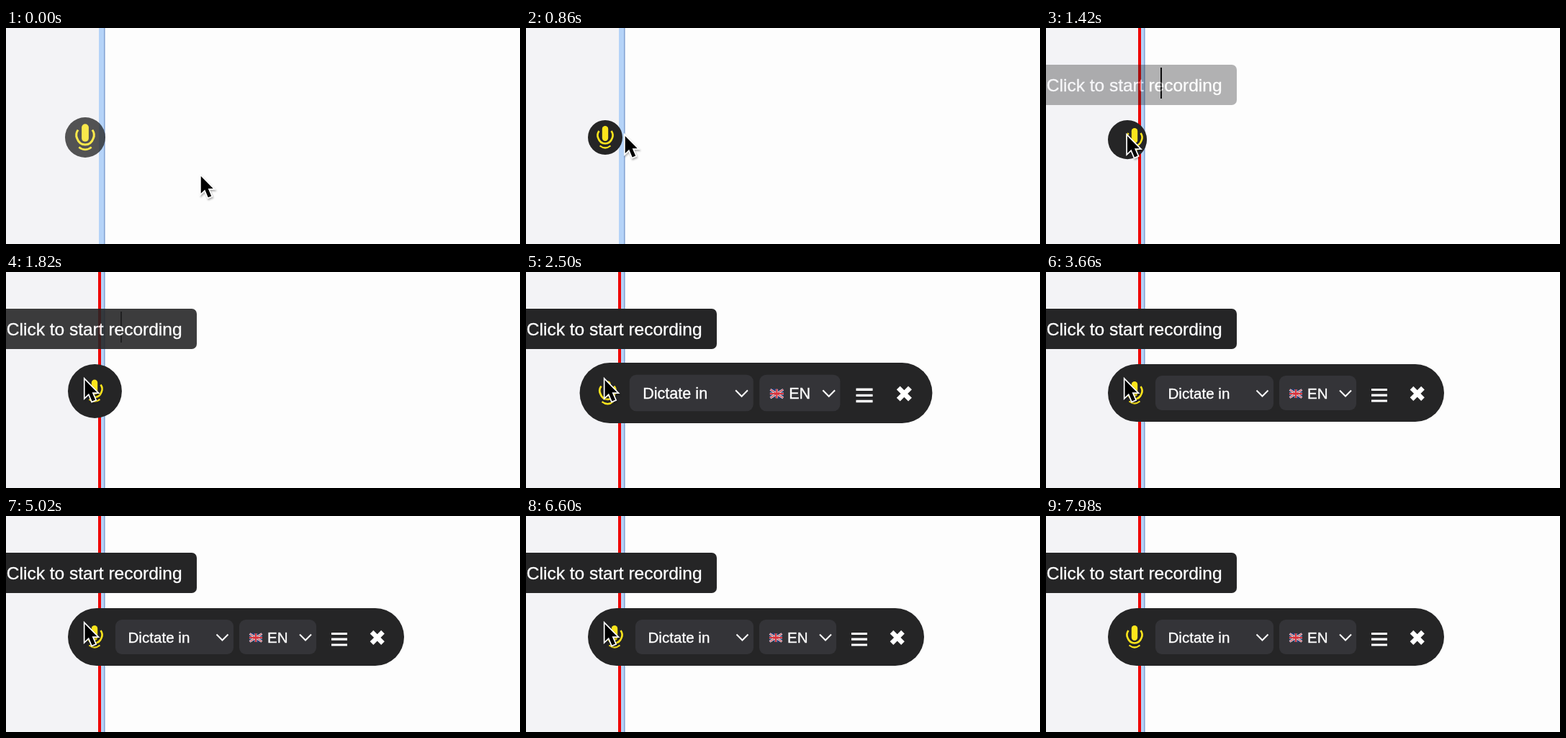
Write an HTML page that moves like this. It is 714 by 300 pixels and loops after 8000 ms.

```html
<!DOCTYPE html>
<html lang="en">
<head>
<meta charset="utf-8">
<title>Dictation widget</title>
<style>
  html, body { margin: 0; width: 100%; height: 100%; overflow: hidden; background: #fdfdfd; }
  svg { display: block; width: 714px; height: 300px; }
  text { font-family: "Liberation Sans", Arial, sans-serif; fill: #fff; stroke: #fff; stroke-width: .35px; }
  .line { fill: none; stroke: #fff; }
  .field { fill: #343438; }
</style>
</head>
<body>
<svg viewBox="0 0 714 300">
  <defs>
    <clipPath id="clip"><rect id="clipBox" x="86" y="128"/></clipPath>
    <path id="chevron" class="line" stroke-width="2" d="M-8-4L0 4L8-4"/>
  </defs>

  <rect width="714" height="300" fill="#fdfdfd"/>
  <rect width="129" height="300" fill="#f3f3f6"/>
  <rect x="129" width="7" height="300" fill="#b5d3f8"/>
  <rect x="136" width="1.6" height="300" fill="#85a5d4"/>
  <rect id="splitter" x="128" width="4" height="300" fill="#f00000"/>
  <rect id="caret" x="159" y="55" width="2" height="43" fill="#000"/>

  <g id="tooltip">
    <rect x="-20" y="51" width="285" height="56" rx="7" fill="#252526"/>
    <text x=".8" y="88" font-size="24.5">Click to start recording</text>
  </g>

  <g id="widget">
    <rect id="body" x="86" y="128" fill="#252526"/>
    <g clip-path="url(#clip)">
      <g id="mic" fill="none" stroke="#fce51c">
        <rect x="-4.2" y="-16" width="8.4" height="21" rx="4.2" fill="#fce51c" stroke="none"/>
        <path d="M-8.5-9Q-12-4-9.7 1Q-7 8.5 0 8.5Q7 8.5 9.7 1Q12-4 8.5-9" stroke-width="2.6"/>
        <path d="M-7.5 11.5Q0 17.5 7.5 11.5" stroke-width="2.2"/>
      </g>
      <g id="items">
        <rect class="field" x="152" y="144" width="164" height="48" rx="9"/>
        <text x="169.5" y="176" font-size="20.6">Dictate in</text>
        <use href="#chevron" x="300.5" y="168.5"/>
        <rect class="field" x="324" y="144" width="107" height="48" rx="9"/>
        <g transform="translate(347 169)" fill="none">
          <path d="M-9-5.5Q-4-7.5 0-6T9-6.5V5.5Q4 7.5 0 6T-9 6.5Z" fill="#25396f"/>
          <path d="M-8.5-5.5L8.5 5.5M8.5-5.5L-8.5 5.5M0-6V6M-9 0H9" stroke="#d9d5d8" stroke-width="3"/>
          <path d="M-8.5-5.5L8.5 5.5M8.5-5.5L-8.5 5.5" stroke="#d8323c" stroke-width="1"/>
          <path d="M0-6V6M-9 0H9" stroke="#d8323c" stroke-width="2"/>
        </g>
        <text x="363" y="176" font-size="20.6">EN</text>
        <use href="#chevron" x="416" y="168.5"/>
        <path class="line" stroke-width="3.2" d="M452 163.5H474M452 171.2H474M452 179H474"/>
        <path class="line" stroke-width="6.6" d="M508 161.2L523.5 176.7M523.5 161.2L508 176.7"/>
      </g>
    </g>
  </g>

  <path id="cursor" d="M0 0V24L5.5 18.7L10 29.5L14.5 27.6L10 17.2H17Z"
        fill="#000" stroke="#fff" stroke-width="3.4" paint-order="stroke"
        style="filter: drop-shadow(1px 2px 1px rgba(0,0,0,.3))"/>
</svg>
<script>
const LOOP = 8000;
const OPEN = 1340, EXPAND = 2500;
const byId = id => document.getElementById(id);
const [splitter, caret, tooltip, widget, body, clipBox, mic, items, cursor] =
  ["splitter", "caret", "tooltip", "widget", "body", "clipBox", "mic", "items", "cursor"].map(byId);

const ramp = (t, from, to) => Math.min(1, Math.max(0, (t - from) / (to - from)));
const smooth = (t, from, to) => { const p = ramp(t, from, to); return p * p * (3 - 2 * p); };
const easeOut = (t, from, to, power = 2) => 1 - (1 - ramp(t, from, to)) ** power;
const show = (el, visible) => el.setAttribute("visibility", visible ? "visible" : "hidden");

// The round button shrinks to rest, grows its padding on hover, then unfolds into the toolbar.
function drawWidget(t) {
  const expanded = t >= EXPAND;
  const height = 48 + 32 * easeOut(t, OPEN, OPEN + 800);
  const width = expanded ? 467 : height;
  for (const box of [body, clipBox]) {
    box.setAttribute("width", width);
    box.setAttribute("height", height);
    box.setAttribute("rx", height / 2);
  }
  const cx = 86 + width / 2, cy = 128 + height / 2;
  const settle = smooth(t, 0, 800);
  const scale = expanded
    ? 1 + 0.049 * (1 - smooth(t, EXPAND, EXPAND + 740))
    : 1 + (1 - settle) / 6;
  widget.setAttribute("transform", `translate(${cx} ${cy}) scale(${scale}) translate(${-cx} ${-cy})`);
  widget.setAttribute("opacity", 0.78 + 0.22 * settle);
  mic.setAttribute("transform", `translate(${t < OPEN ? 110 : 123} ${cy})`);
  show(items, expanded);
}

function draw(t) {
  const x = 271 - 161.5 * easeOut(t, 0, 2000, 3.1);
  const y = 206 - 56 * easeOut(t, 0, 860);
  cursor.setAttribute("transform", `translate(${x} ${y})`);
  show(cursor, t < 7760);
  show(splitter, t >= 1060);
  show(caret, t >= 1200);
  tooltip.setAttribute("opacity", easeOut(t, 1260, 2100));
  drawWidget(t);
}

function frame() {
  draw(performance.now() % LOOP);
  requestAnimationFrame(frame);
}
frame();
</script>
</body>
</html>
```
